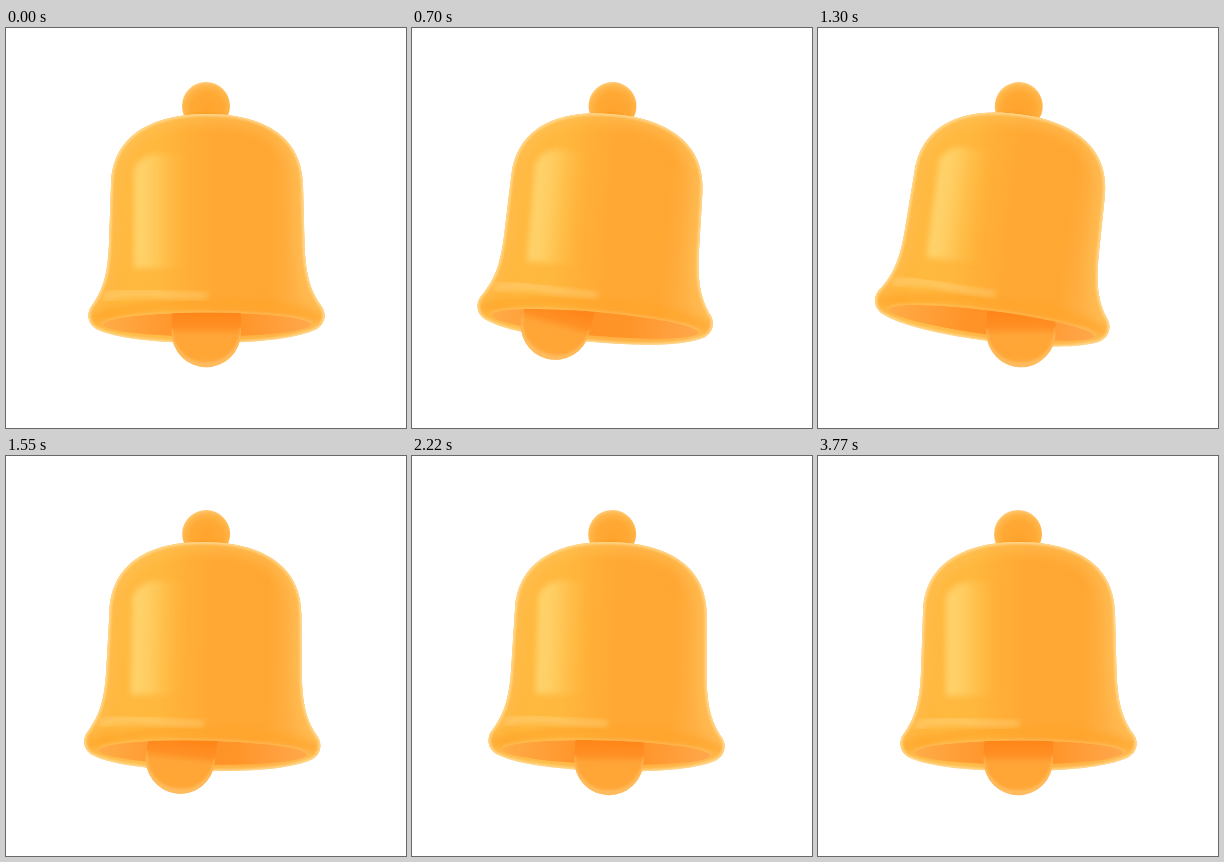
Animation of 400 by 400 pixels, one loop 3800 ms. Source, as an HTML page:

```html
<!DOCTYPE html>
<html lang="en">
<head>
<meta charset="utf-8">
<title>Ringing bell</title>
<style>
html, body { margin: 0; width: 100%; height: 100%; overflow: hidden; background: #fff; }
svg { display: block; width: 100%; height: 100%; }
</style>
</head>
<body>
<svg viewBox="0 0 400 400">
  <defs>
    <linearGradient id="skin" gradientUnits="userSpaceOnUse" x1="82" x2="320" y1="0" y2="0">
      <stop offset="0" stop-color="#ffae30"/>
      <stop offset=".16" stop-color="#ffb93f"/>
      <stop offset=".3" stop-color="#ffb83e"/>
      <stop offset=".42" stop-color="#ffaf37"/>
      <stop offset=".54" stop-color="#ffa834"/>
      <stop offset=".76" stop-color="#ffa733"/>
      <stop offset=".9" stop-color="#ffb348"/>
      <stop offset="1" stop-color="#ffb54a"/>
    </linearGradient>
    <linearGradient id="shine" x1="0" x2="1" y1="0" y2="0">
      <stop offset="0" stop-color="#ffda78"/>
      <stop offset=".3" stop-color="#ffd36c" stop-opacity=".9"/>
      <stop offset="1" stop-color="#ffb840" stop-opacity="0"/>
    </linearGradient>
    <linearGradient id="inside" gradientUnits="userSpaceOnUse" x1="97" x2="305" y1="0" y2="0">
      <stop offset="0" stop-color="#ffac48"/>
      <stop offset=".4" stop-color="#ff9226"/>
      <stop offset=".65" stop-color="#ff9428"/>
      <stop offset="1" stop-color="#ffa84c"/>
    </linearGradient>
    <radialGradient id="knob" cx=".52" cy=".56" r=".56">
      <stop offset="0" stop-color="#ffa42e"/>
      <stop offset=".6" stop-color="#ffa934"/>
      <stop offset=".85" stop-color="#ffb548"/>
      <stop offset="1" stop-color="#ffc975"/>
    </radialGradient>
    <linearGradient id="ball" x1="0" x2="0" y1="0" y2="1">
      <stop offset=".22" stop-color="#ff8619"/>
      <stop offset=".42" stop-color="#ff9025"/>
      <stop offset=".54" stop-color="#ffa537"/>
      <stop offset=".85" stop-color="#ffa636"/>
      <stop offset="1" stop-color="#ffac44"/>
    </linearGradient>
    <filter id="wide" x="-50%" y="-50%" width="200%" height="200%"><feGaussianBlur stdDeviation="7"/></filter>
    <filter id="soft" x="-30%" y="-50%" width="160%" height="200%"><feGaussianBlur stdDeviation="3"/></filter>
    <filter id="fine" x="-20%" y="-50%" width="140%" height="200%"><feGaussianBlur stdDeviation="1.300"/></filter>
    <path id="shell" d="M201 86C148 86 106 106 105 157L103 215C102 246 97 261 87 276C80 284 81 295 90 301C112 312 160 315 201 315S289 312 311 301C320 295 321 284 314 276C304 261 299.500 246 298.500 215L297 157C296 106 254 86 201 86Z"/>
    <path id="bulb" d="M167 270H235V304A34.500 35 0 0 1 165.500 304Z"/>
    <clipPath id="shellClip"><use href="#shell"/></clipPath>
    <clipPath id="bulbClip"><use href="#bulb"/></clipPath>
    <clipPath id="frontClip"><path d="M60 60H340V296.500H305A104 12 0 0 0 97 296.500H60Z"/></clipPath>
    <g id="body" clip-path="url(#shellClip)" fill="none">
      <use href="#shell" fill="url(#skin)"/>
      <use href="#shell" stroke="#ffc25a" stroke-width="18" opacity=".6" filter="url(#wide)"/>
      <path d="M128 142Q132 130 146 126H184V240H128Z" fill="url(#shine)" opacity=".85" filter="url(#soft)"/>
      <path d="M98 270Q118 262 150 266T201 269" stroke="#ffd27a" stroke-width="9" opacity=".6" filter="url(#soft)"/>
      <path d="M86 291Q130 276 201 275T316 291" stroke="#ffa42c" stroke-width="9" opacity=".7" filter="url(#soft)"/>
      <path d="M97 296.500A104 12 0 0 1 305 296.500" stroke="#ffc061" stroke-width="3" opacity=".7" filter="url(#fine)"/>
      <use href="#shell" stroke="#ffdf9f" stroke-width="4" opacity=".8" filter="url(#fine)"/>
    </g>
  </defs>

  <g class="bell">
    <circle cx="200" cy="78" r="24" fill="url(#knob)"/>
    <path d="M182 87Q200 81 218 87V94H182Z" fill="#f99a24" opacity=".6" filter="url(#fine)"/>
    <use href="#body"/>
    <ellipse cx="201" cy="296.500" rx="104" ry="12" fill="url(#inside)"/>
  </g>
  <g id="clapper">
    <use href="#bulb" fill="url(#ball)"/>
    <path d="M165.500 300A34.500 35 0 0 0 235 300V304A34.500 35 0 0 1 165.500 304Z" fill="#ffc873" stroke="#ffc873" stroke-width="2" opacity=".6" clip-path="url(#bulbClip)" filter="url(#fine)"/>
  </g>
  <g class="bell"><g clip-path="url(#frontClip)"><use href="#body"/></g></g>
</svg>
<script>
const LOOP = 3800, PIVOT = "200 84";
// [time in ms, angle in degrees] at each turning point
const bellKeys = [[0, 0], [508, 16], [989, -16], [1320, 7.6], [1745, -3.7], [2180, 1.7], [2720, 0]];
const clapperKeys = [[60, 0], [650, 16], [1085, -16], [1452, 8], [1912, -3.2], [2320, 1.5], [2780, -0.2], [3230, 0]];
const bells = document.querySelectorAll(".bell");
const clapper = document.getElementById("clapper");

function swing(keys, t) {
  const i = keys.findIndex(k => k[0] > t);
  if (i < 1) return 0;
  const [t0, a] = keys[i - 1], [t1, b] = keys[i];
  return a + (b - a) * (1 - Math.cos(Math.PI * (t - t0) / (t1 - t0))) / 2;
}

function turn(el, angle) {
  el.setAttribute("transform", `rotate(${angle} ${PIVOT})`);
}

function draw() {
  const t = performance.now() % LOOP;
  const angle = swing(bellKeys, t);
  bells.forEach(el => turn(el, angle));
  turn(clapper, swing(clapperKeys, t));
  requestAnimationFrame(draw);
}
draw();
</script>
</body>
</html>
```
